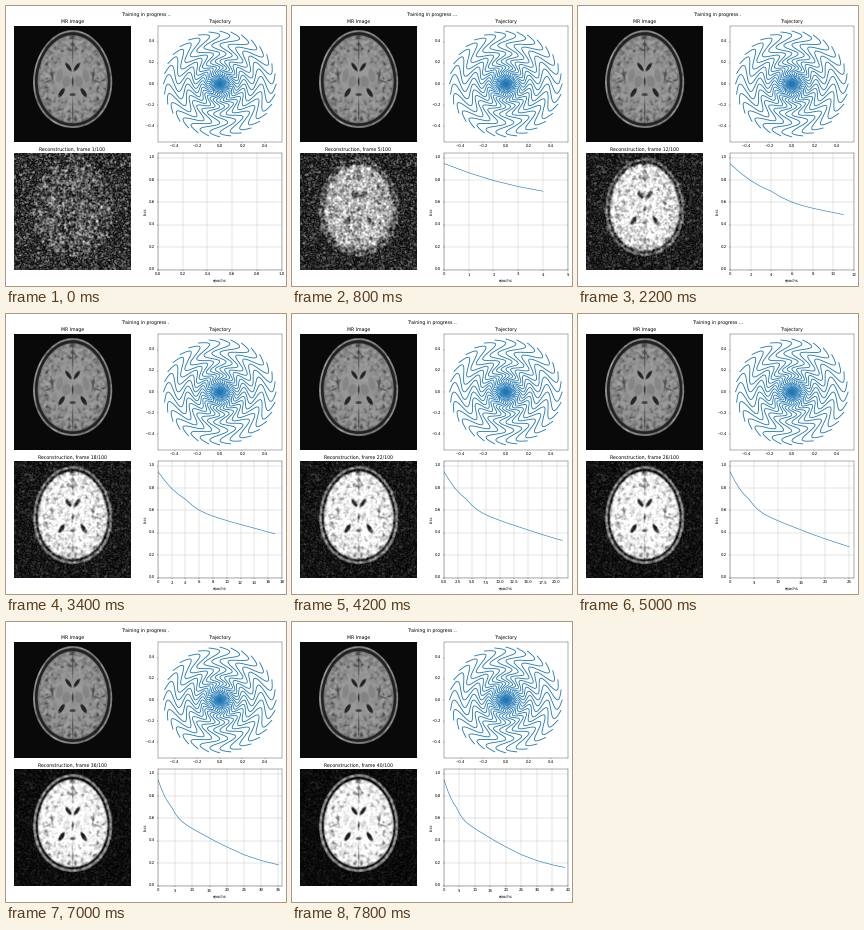
Write a matplotlib script that moves like this. It is 280x280 px and loops after 8 s.

```python
import numpy as np
import matplotlib.pyplot as plt
from matplotlib.animation import FuncAnimation

SIZE, DPI = 280, 28
N = 117                      # image samples per side
BOX = 116.5                  # panel height in pixels
LEFT, RIGHT, WIDE = 7.9, 151.9, 123.9
TOP, LOW = 19.7, 147.3
FRAMES, EPOCHS = 40, 100

plt.rcParams["font.family"] = "DejaVu Sans"
plt.rcParams["text.hinting"] = "none"

rng = np.random.default_rng(7)
# Sample centres in stage coordinates
step = (np.arange(N) + 0.5) * BOX / N
X, Y = np.meshgrid(LEFT + step, TOP + step)
CX, CY = 66.3, 73.5


def blur(img, sigma):
    fx, fy = np.meshgrid(np.fft.fftfreq(N), np.fft.fftfreq(N))
    keep = np.exp(-2 * (np.pi * sigma) ** 2 * (fx**2 + fy**2))
    return np.fft.ifft2(np.fft.fft2(img) * keep).real


def smooth_noise(fine, coarse=None):
    """Unit-variance noise at one pixel scale, or between two scales."""
    raw = rng.standard_normal((N, N))
    out = blur(raw, fine)
    if coarse:
        out -= blur(raw, coarse)
    return out / out.std()


def blob(cx, cy, rx, ry, angle=0.0, x=X, y=Y):
    """Antialiased ellipse mask."""
    c, s = np.cos(np.radians(angle)), np.sin(np.radians(angle))
    u = (x - cx) * c + (y - cy) * s
    v = (y - cy) * c - (x - cx) * s
    d = np.hypot(u / rx, v / ry)
    return np.clip((1 - d) * min(rx, ry) + 0.5, 0, 1)


def pair(dx, cy, rx, ry, angle=0.0):
    """Ellipse and its mirror image about the midline."""
    return np.maximum(blob(CX - dx, cy, rx, ry, angle),
                      blob(CX + dx, cy, rx, ry, -angle))


def mix(img, value, mask):
    return img + (value - img) * mask


def brain_tissue(depth):
    folds = smooth_noise(1.2, 3.2)
    folds = 0.6 * folds + 0.6 * folds[:, ::-1] + 0.35 * smooth_noise(1.0, 2.5)
    cortex = np.clip((depth - 0.4) / 0.35, 0, 1)
    img = 150 + 3 * smooth_noise(2) - 14 * cortex
    img += cortex * 15 * np.clip(folds, -1.6, 1.2)
    img = mix(img, 70, cortex * np.clip(-folds - 1.1, 0, 0.7))
    img = mix(img, 95, 0.5 * np.clip((depth - 0.94) / 0.06, 0, 1))
    img = mix(img, 128, 0.8 * pair(6, 76, 4, 5.5, 15))
    img = mix(img, 130, 0.8 * pair(13, 70, 3, 7, 12))
    img = mix(img, 70, 0.7 * pair(20.5, 70, 1.0, 6, -8))
    img = mix(img, 75, 0.7 * pair(25, 76, 4, 0.9, -20))
    img = mix(img, 65, 0.7 * blob(CX, 43, 0.8, 12))
    img = mix(img, 65, 0.7 * blob(CX, 106, 0.8, 11))
    csf = np.maximum(pair(4.2, 61.5, 1.7, 4.8, -35),
                     pair(11, 87, 2.0, 5.0, 32))
    csf = np.maximum(csf, 0.8 * blob(CX, 76, 0.9, 4))
    csf = np.maximum(csf, 0.7 * blob(CX, 89, 3, 1.6))
    return mix(img, 38, csf)


egg = CX + (X - CX) / (1 + 0.06 * (Y - CY) / 48)
scalp = blob(CX, CY, 39.3, 48.7, x=egg)
skull = blob(CX, CY, 37.5, 46.8, x=egg)
brain = blob(CX, CY + 0.2, 34.8, 43.8, x=egg)
tissue = brain_tissue(np.hypot((egg - CX) / 34.8, (Y - CY) / 43.8))

mr = np.full((N, N), 9.0)
mr = mix(mr, 128 + 14 * smooth_noise(1.5), scalp)
mr = mix(mr, 34, skull)
mr = mix(mr, tissue, brain)

theta = np.arctan2(Y - CY, X - CX)
beads = 0.8 + 0.2 * np.sin(34 * theta) * np.sin(5 * theta + 1)
rim = scalp * (1 - blob(CX, CY, 36.6, 46, x=egg))
clean = 175 * rim * beads
clean = mix(clean, np.clip(2.2 * tissue - 62, 25, 250), brain)

grain = [smooth_noise(0.75) for _ in range(4)]
KEYS = [1, 5, 12, 18, 26, 40]


def reconstruct(n):
    gain = np.interp(n, KEYS, [0.34, 0.75, 0.95, 0.98, 1.0, 1.0])
    sigma = np.interp(n, KEYS, [42, 34, 26, 20, 15, 10])
    soft = np.interp(n, KEYS, [2.2, 1.4, 0.9, 0.7, 0.6, 0.5])
    ring = np.interp(n, [1, 5, 10], [90, 35, 0])
    a = 0.08 * min(n - 1, 13)
    re = np.cos(a) * grain[0] + np.sin(a) * grain[1]
    im = np.cos(a) * grain[2] + np.sin(a) * grain[3]
    real = blur(gain * clean + ring * rim, soft) + sigma * re
    return np.clip(np.hypot(real, sigma * im), 0, 255)


def cone_shots(shots=32, samples=256, zigzags=5, width=2):
    s = np.linspace(0, 1, samples)
    x = 0.5 * s
    y = x * np.sin(2 * np.pi * zigzags * np.sqrt(s)) * width * np.pi / shots
    for t in 2 * np.pi * np.arange(shots) / shots:
        yield x * np.cos(t) - y * np.sin(t), x * np.sin(t) + y * np.cos(t)


loss = np.interp(
    np.arange(FRAMES),
    [0, 1, 2, 3, 4, 5, 6, 7, 8, 9, 11, 14, 17, 20, 25, 30, 35, 39],
    [0.947, 0.865, 0.795, 0.742, 0.70, 0.645, 0.603, 0.573, 0.549, 0.529,
     0.492, 0.442, 0.392, 0.347, 0.277, 0.225, 0.187, 0.163])

fig = plt.figure(figsize=(SIZE / DPI, SIZE / DPI), dpi=DPI, facecolor="white")


def panel(x, y, w):
    return fig.add_axes([x / SIZE, 1 - (y + BOX) / SIZE, w / SIZE, BOX / SIZE])


def picture(y, data):
    ax = panel(LEFT, y, BOX)
    im = ax.imshow(data, cmap="gray", vmin=0, vmax=255, aspect="auto",
                   interpolation="nearest")
    ax.axis("off")
    return ax, im


heading = fig.suptitle("", x=0.498, y=0.978)
ax_mr, _ = picture(TOP, mr)
ax_mr.set_title("MR Image")
ax_rec, rec_im = picture(LOW, reconstruct(1))

ax_traj = panel(RIGHT, TOP, WIDE)
for kx, ky in cone_shots():
    ax_traj.plot(kx, ky, color="C0", lw=2.2, solid_capstyle="round")
ax_traj.set(xlim=(-0.55, 0.55), ylim=(-0.55, 0.55), title="Trajectory")

ax_loss = panel(RIGHT, LOW, WIDE)
curve, = ax_loss.plot([], [], color="C0", lw=1.5)
ax_loss.set(ylim=(0, 1.038), xlabel="epochs", ylabel="loss")
ax_loss.grid(True)


def draw(i):
    n = i + 1
    heading.set_text("Training in progress " + "." * (1 + n % 3))
    ax_rec.set_title(f"Reconstruction, frame {n}/{EPOCHS}")
    rec_im.set_data(reconstruct(n))
    curve.set_data(np.arange(n), loss[:n])
    ax_loss.set_xlim(0, n)
    return heading, rec_im, curve


anim = FuncAnimation(fig, draw, frames=FRAMES, interval=200, repeat=True,
                     repeat_delay=0, blit=False)
plt.show()
```
